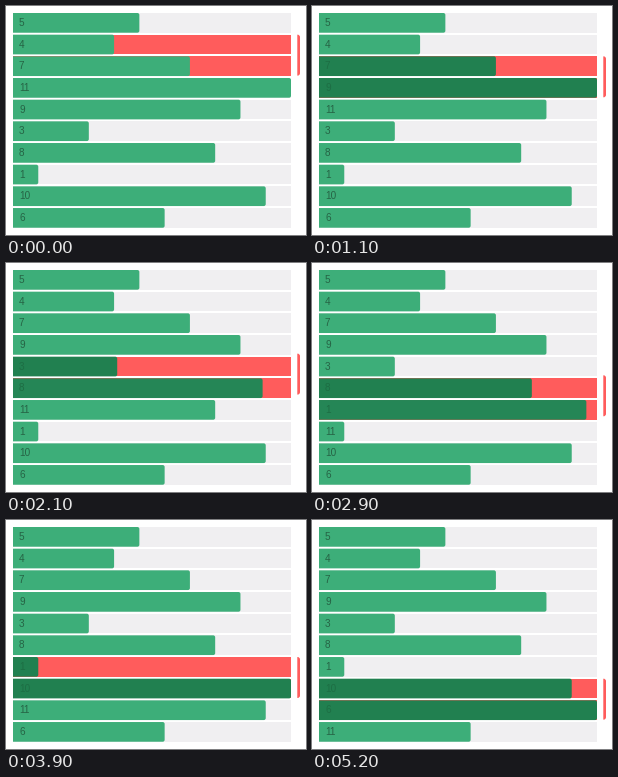
Animation, 300 px wide and 229 px high, one loop 5300 ms. Source, as a matplotlib script:

```python
import matplotlib.pyplot as plt
import numpy as np
from matplotlib.animation import FuncAnimation
from matplotlib.patches import PathPatch, Rectangle
from matplotlib.path import Path

W, H, DPI = 300, 229, 100
FRAMES, INTERVAL = 53, 100
LEFT, TOP, FULL = 7, 7, 278
PITCH, ROW_H = 21.67, 19.7
VALUES = [5, 4, 7, 11, 9, 3, 8, 1, 10, 6]
STARTS = [0, 353, 1153, 1953, 2753, 3553, 4372]  # ms, one per compared pair
MOVE_MS = 200


def rgb(r, g, b):
    return np.array([r, g, b]) / 255


GREEN, DARK = rgb(61, 174, 121), rgb(33, 128, 80)
GRAY, RED = rgb(240, 239, 241), rgb(255, 92, 92)
INK, DIM_INK = rgb(38, 100, 69), rgb(29, 110, 68)


def mix(a, b, t):
    return a + (b - a) * t


def ease(u):
    u = min(max(u, 0), 1)
    return 2 * u * u if u < 0.5 else 1 - 2 * (1 - u) ** 2


def row_top(i):
    return TOP + i * PITCH


def round_right(x, y, w, h, r):
    """Rectangle whose two right corners are rounded."""
    pts = [(x, y), (x + w - r, y), (x + w, y), (x + w, y + r),
           (x + w, y + h - r), (x + w, y + h), (x + w - r, y + h),
           (x, y + h), (x, y)]
    codes = [Path.MOVETO, Path.LINETO, Path.CURVE3, Path.CURVE3, Path.LINETO,
             Path.CURVE3, Path.CURVE3, Path.LINETO, Path.CLOSEPOLY]
    return Path(pts, codes)


def sorted_through(last):
    """Values after comparing each pair from row 1 up to row `last`."""
    a = VALUES[:]
    for i in range(1, last + 1):
        if a[i] > a[i + 1]:
            a[i], a[i + 1] = a[i + 1], a[i]
    return a


fig = plt.figure(figsize=(W / DPI, H / DPI), dpi=DPI, facecolor="white")
ax = fig.add_axes([0, 0, 1, 1])
ax.set_xlim(0, W)
ax.set_ylim(H, 0)
ax.axis("off")

tracks, bars, labels = [], [], []
for row in range(len(VALUES)):
    y = row_top(row)
    track = Rectangle((LEFT, y), FULL, ROW_H, lw=0)
    bar = PathPatch(round_right(LEFT, y, FULL, ROW_H, 2), lw=0)
    tracks.append(ax.add_patch(track))
    bars.append(ax.add_patch(bar))
    labels.append(ax.text(13, y + 13.1, "", family="Liberation Sans",
                          size=10 * 72 / DPI, va="baseline"))
pointer = ax.add_patch(PathPatch(round_right(0, 0, 3, 40, 2.5),
                                 fc=RED, lw=0))


def draw(frame):
    t = frame * INTERVAL
    step = sum(s <= t for s in STARTS) - 1
    q = ease((t - STARTS[step]) / MOVE_MS)
    pair = step + 1

    before, after = sorted_through(pair - 1), sorted_through(pair)
    names = sorted_through(pair + 1)
    shade = {pair: 1 if step else q, pair + 1: q}

    for i, bar in enumerate(bars):
        width = mix(before[i], after[i], q) / max(VALUES) * FULL
        dark = shade.get(i, 0)
        bar.set_path(round_right(LEFT, row_top(i), width, ROW_H, 2))
        bar.set_facecolor(mix(GREEN, DARK, dark))
        tracks[i].set_facecolor(RED if i in shade else GRAY)
        labels[i].set_text(str(names[i]))
        labels[i].set_color(mix(INK, DIM_INK, dark))

    pos = pair - 1 + q if step else pair
    pointer.set_path(round_right(291.3, row_top(pos), 2.7,
                                 PITCH + ROW_H - 0.4, 2.5))
    return [*tracks, *bars, *labels, pointer]


anim = FuncAnimation(fig, draw, frames=FRAMES, interval=INTERVAL,
                     repeat=True, repeat_delay=0, blit=False)
plt.show()
```
